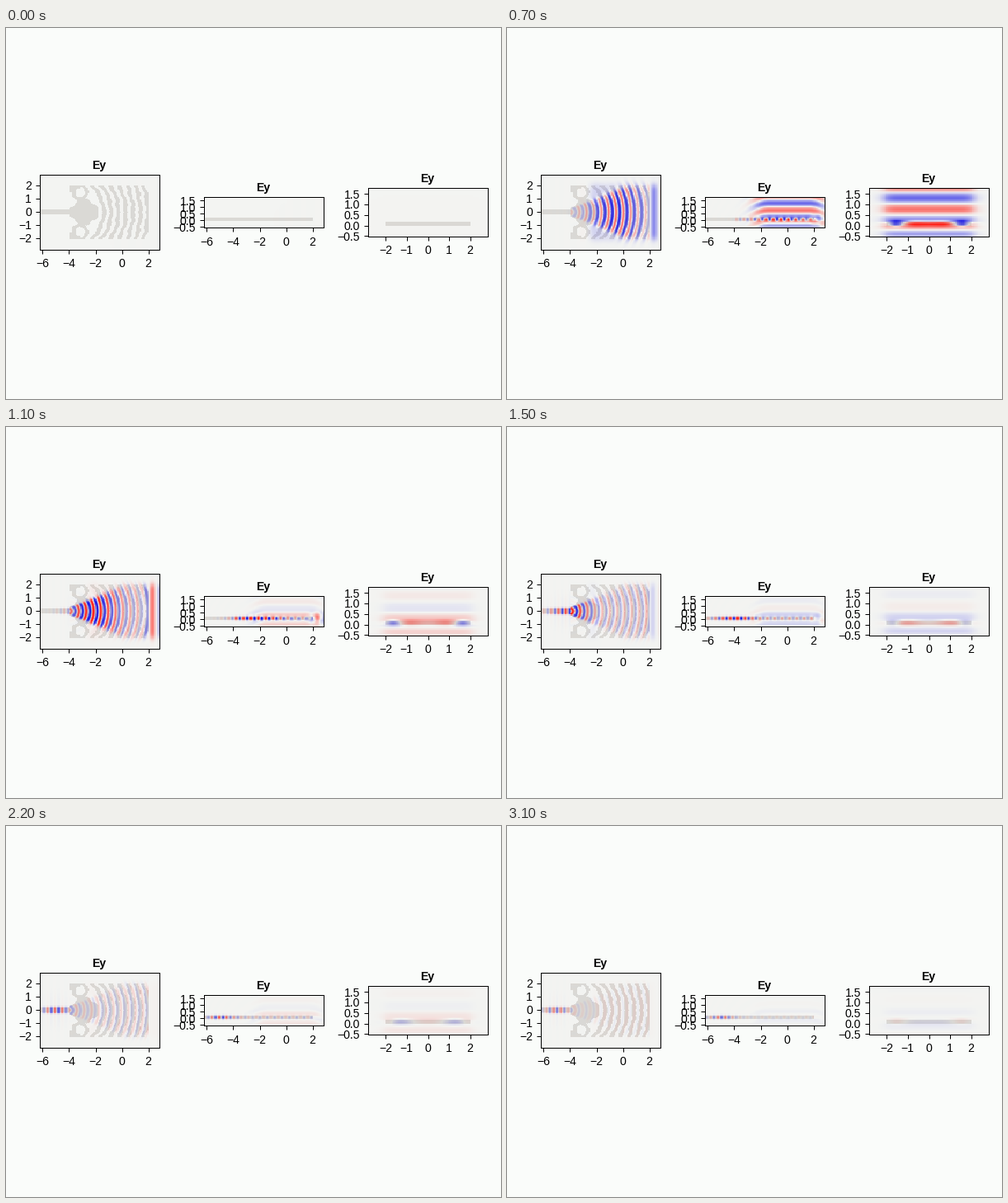
A matplotlib script for the animation above (3200 ms loop, 600 by 450 pixels).

```python
import numpy as np
import matplotlib.pyplot as plt
from matplotlib.animation import FuncAnimation

W, H, DPI = 600, 450, 100
FRAMES, STEP = 32, 100
PX = 72 / DPI
TAU = 2 * np.pi
AIR, PITCH = 1.08, 0.555       # wavelength above the chip, grating period
THICK = 0.22                   # chip layer height
CELL = 0.07

PAPER = "#fafcfa"
PLATE = np.array([243, 244, 242]) / 255
CORE = np.array([218, 217, 213]) / 255
RED = np.array([255, 38, 30]) / 255
BLUE = np.array([22, 20, 228]) / 255

plt.rcParams["font.family"] = "Liberation Sans"
fig = plt.figure(figsize=(W / DPI, H / DPI), dpi=DPI, facecolor=PAPER)


def bell(u, width):
    return np.exp(-(u / width) ** 2)


def step(u):
    return 1 / (1 + np.exp(-u))


def flat_top(u, half, power=14):
    return 1 / (1 + (np.abs(u) / half) ** power)


# ---------- chip ----------
def radius(x, y):
    return np.where(x < -4, x, np.hypot(x + 4, y) - 4)


def chip(x, y):
    v = np.abs(y)
    r = radius(x, y)
    box = (x > -4) & (x < 2) & (v < 2)
    wobble = .5 * np.sin(5.3 * v + 2 * x) + .35 * np.sin(11 * v - 3 * x)
    arcs = (r > -1.65) & (np.cos(TAU * (r - .28) / PITCH + wobble) > -.05)
    half = .2 + .75 * np.sin(np.pi * (x + 4) / 2.3) + .08 * np.sin(9 * x)
    body = (v < half) & (x < -1.8)
    ring = np.abs(np.hypot(x + 3.15, v - 1.5) - .5 + .07 * wobble) < .13
    rim = (x < -3.65) & (v > 1.5) | (v > 1.8) & (np.sin(7 * x) > -.2)
    lead = (x <= -3.9) & (v < .21)
    return lead | box & (arcs | body | (r < -1.7) & (ring | rim))


def slab(z):
    return (z > -.01) & (z < THICK)


# ---------- field ----------
def incident(n, x, y, z):
    """Plane wave from above: strong near the chip first, then reflected up."""
    low = step((.65 - z) / .07)
    pulse = bell(n - 5.3 + 1.3 * low, 2.6 - .2 * low)
    echo = .3 * np.exp(-n / 12) * (1 - np.exp(-(n / 5) ** 4)) * (.5 + low)
    gain = np.where(slab(z), .45, .85 + .35 * low) * np.clip((z + .65) / .35, 0, 1)

    late = step((n - 5.5) * 3)
    bend = .22 * late * np.maximum(np.abs(x - .1) - 1.5, 0) ** 2
    delay = .37 * (np.clip(z / THICK, 0, 1) - 1)
    turns = .36 * (n - 4) + .17 * np.tanh(n - 4)
    wave = np.cos(TAU * ((z + delay + bend - 1.05) / AIR + turns))
    window = flat_top(x - .1, 2 + .5 * late, 10) * flat_top(y, 2.1)
    return (n > 0) * (pulse + echo) * gain * wave * window


def guided(n, x, y, z):
    """Wave gathered by the grating, focused into the lead on the left."""
    amp = (1 - np.exp(-(n / 6) ** 3)) * np.exp(-max(n - 16, 0) / 30)
    centre = -5 * step((n - 11.5) / 2.2)
    length = 1.9 - .95 * step((n - 15) / 2)
    age = max(n - 5, 0) / 7
    trail = .3 * age * np.exp(1 - age) * (x > -4)
    wave = np.cos(TAU * ((radius(x, y) - .28) / PITCH + .48 * (n - 4)))

    half = np.minimum(.25 + .4 * np.maximum(x + 4, 0), 1.95)
    across = flat_top(y, half, 14) + .05 * bell(y, 1.2)
    return ((amp * bell(x - centre, length) + trail) * wave * across
            * bell(z - .1, .14) * (x < 2))


def outgoing(n, x, y, z):
    """Light leaving past the right edge of the chip."""
    wave = np.cos(TAU * ((x - 2.3) / AIR - .36 * (n - 11)))
    return .6 * bell(n - 10, 4) * wave * bell(x - 2.3, .6) * flat_top(y, 2) * bell(z - .1, .35)


def paint(n, pts, mask):
    e = (incident(n, *pts) + guided(n, *pts) + outgoing(n, *pts))[..., None]
    a = np.clip(np.abs(e), 0, 1)
    base = np.where(mask[..., None], CORE, PLATE)
    return base * (1 - a) + np.where(e > 0, RED, BLUE) * a


# ---------- panels ----------
def write(x, y, text, ha="center", **kw):
    fig.text((x - .5) / W, 1 - y / H, text, ha=ha, va="baseline",
             fontsize=14 * PX, color="black", **kw)


def label(v, digits):
    return f"{v:.{digits}f}".replace("-", "\u2212")


def panel(left, top, right, bottom, origin, scale, xticks, yticks, digits):
    ox, oy = origin
    x0, x1 = (left - ox) / scale, (right - ox) / scale
    y0, y1 = (oy - bottom) / scale, (oy - top) / scale
    ax = fig.add_axes([left / W, 1 - (bottom - .4) / H,
                       (right - left) / W, (bottom - top) / H])
    cols, rows = round((x1 - x0) / CELL), round((y1 - y0) / CELL)
    u = x0 + (np.arange(cols) + .5) * (x1 - x0) / cols
    v = y0 + (np.arange(rows) + .5) * (y1 - y0) / rows
    img = ax.imshow(np.ones((rows, cols, 3)), origin="lower",
                    extent=[x0, x1, y0, y1], aspect="auto",
                    interpolation="nearest")
    ax.set_xticks(xticks, [""] * len(xticks))
    ax.set_yticks(yticks, [""] * len(yticks))
    ax.tick_params(length=5 * PX, width=PX)
    for s in ax.spines.values():
        s.set_linewidth(PX)
    for t in xticks:
        write(ox + t * scale, bottom + 21.5, label(t, 0))
    for t in yticks:
        write(left - 9.5, oy - t * scale + 5, label(t, digits), ha="right")
    write((left + right) / 2, top - 7, "Ey", weight="bold")
    return img, *np.meshgrid(u, v)


along, across = np.arange(-6, 3, 2), np.arange(-2, 3)
heights = np.arange(-.5, 2, .5)
top_img, xa, ya = panel(41, 178, 186, 269, (140.6, 223.4), 16.03, along, across, 0)
side_img, xb, zb = panel(240, 205, 385, 242, (339.6, 233.6), 16.03, along, heights, 1)
end_img, yc, zc = panel(439, 194, 584, 253, (511.5, 240), 25.6, across, heights, 1)

views = [
    (top_img, (xa, ya, np.full_like(xa, .17)), chip(xa, ya)),
    (side_img, (xb, np.zeros_like(xb), zb), slab(zb) & (xb < 2)),
    (end_img, (np.zeros_like(yc), yc, zc), slab(zc) & (np.abs(yc) < 2)),
]


def draw(n):
    for img, pts, mask in views:
        img.set_data(paint(n, pts, mask))
    return [img for img, _, _ in views]


anim = FuncAnimation(fig, draw, frames=FRAMES, interval=STEP,
                     repeat=True, repeat_delay=0, init_func=lambda: draw(0))
plt.show()
```
